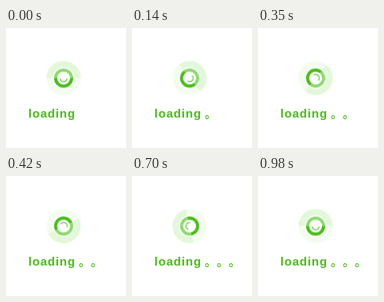
An HTML page that plays this animation: 150x150 px, repeating every 1.05 s.

```html
<!DOCTYPE html>
<html lang="en">
<head>
<meta charset="utf-8">
<title>Loading</title>
<style>
  html, body { margin: 0; width: 100%; height: 100%; overflow: hidden; background: #fff; }
  svg { display: block; width: 100vw; height: 100vh; }
  path { fill: none; }
  text { font: bold 15px "Liberation Sans", Arial, sans-serif; fill: #4cbc1c; }
  .word { letter-spacing: .8px; }
  .dot { font-family: "Noto Sans CJK SC", "Noto Sans CJK JP", "Noto Sans CJK", sans-serif; font-size: 14px; }

  /* 15 poses per loop; the last one equals the first */
  .cw, .ccw { animation: spin 1050ms steps(15, jump-none) infinite; }
  .ccw { animation-direction: reverse; }
  @keyframes spin { from { transform: rotate(0deg); } to { transform: rotate(360deg); } }

  .dot { opacity: 0; animation: 1050ms step-end infinite; }
  .d1 { animation-name: show1; }
  .d2 { animation-name: show2; }
  .d3 { animation-name: show3; }
  @keyframes show1 { 0% { opacity: 0; } 6.66%, 100% { opacity: 1; } }
  @keyframes show2 { 0% { opacity: 0; } 33.33%, 100% { opacity: 1; } }
  @keyframes show3 { 0% { opacity: 0; } 59.99%, 100% { opacity: 1; } }
</style>
</head>
<body>
<svg viewBox="0 0 150 150">
  <g transform="translate(72 62.6)">
    <g class="cw">
      <path d="M-17.4 0A17.4 17.4 0 0 0 17.4 0" stroke="#f3fdef" stroke-width="8"/>
      <path d="M-17.4 0A17.4 17.4 0 0 1 17.4 0" stroke="#e3f8da" stroke-width="8"/>
      <path d="M-10 0A10 10 0 0 1 10 0" stroke="#8eda70" stroke-width="4"/>
      <path d="M-10 0A10 10 0 0 0 10 0" stroke="#4cbc1c" stroke-width="4"/>
    </g>
    <g class="ccw">
      <path d="M-4.2 .4A4.2 4.2 0 0 0 4.2 .4" stroke="#72cc4c" stroke-width="1.5"/>
    </g>
  </g>
  <text class="word" x="28" y="112">loading</text>
  <text class="dot d1" x="91" y="111.8">。</text>
  <text class="dot d2" x="106" y="111.8">。</text>
  <text class="dot d3" x="121" y="111.8">。</text>
</svg>
</body>
</html>
```
